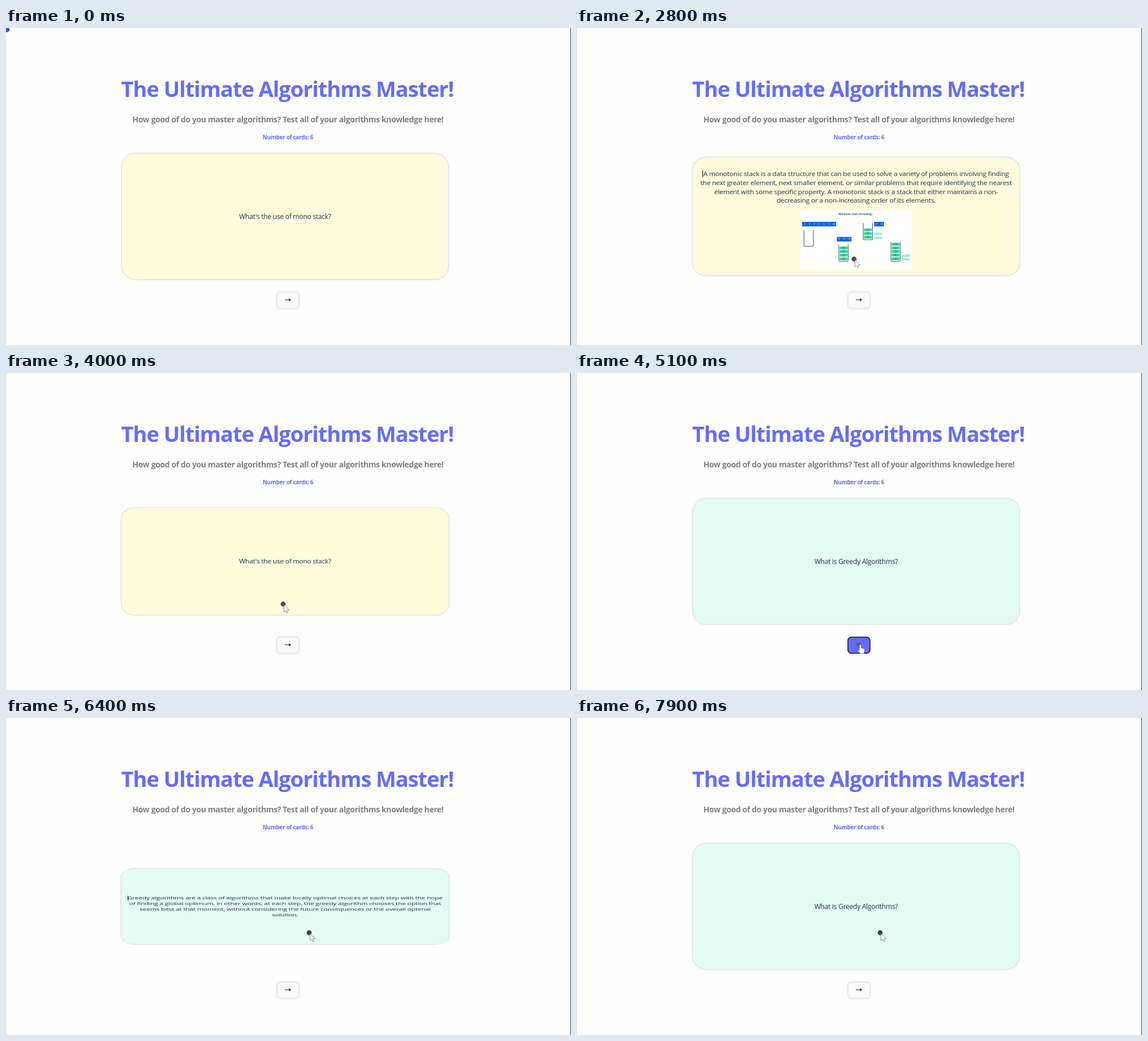
These frames come from a looping animation (999x561 px, 8000 ms). An HTML page:

```html
<!DOCTYPE html>
<html lang="en">
<head>
<meta charset="utf-8">
<title>Flash cards</title>
<style>
  html, body { margin: 0; width: 100%; height: 100%; overflow: hidden; background: #fefefe; }
  svg { display: block; width: 999px; height: 561px; }
  text { font-family: "Open Sans", "Noto Sans", sans-serif; text-anchor: middle; fill: #213547; }
  .bold { font-weight: 700; letter-spacing: -.028em; }
  .body { font-size: 12px; letter-spacing: -.02em; }
  .accent { fill: #646cff; }
  .tiny { font-size: 4.6px; }
  #face { stroke: #dcdddd; filter: drop-shadow(0 0 1.5px rgba(0, 0, 0, .1)); }
  #button { filter: drop-shadow(0 0 2px rgba(60, 60, 110, .14)); }
</style>
</head>
<body>
<svg viewBox="0 0 999 561">
  <rect x="998" width="1" height="561" fill="#27313a"/>
  <text class="bold accent" x="497.5" y="122" font-size="38">The Ultimate Algorithms Master!</text>
  <text class="bold" x="498.5" y="166.5" font-size="14" style="fill:#808080">How good of do you master algorithms? Test all of your algorithms knowledge here!</text>
  <text class="bold accent" x="498.5" y="196.5" font-size="10">Number of cards: 6</text>

  <g id="card">
    <rect id="face" x="-289" y="-111.5" width="578" height="223" rx="24"/>
    <text id="question" class="body" y="4.5"></text>
    <g id="answer"></g>
    <g id="diagram"></g>
    <path id="caret" stroke="#222" stroke-width="1.2"/>
  </g>

  <rect id="button" x="479" y="467.5" width="39" height="28.5" rx="6"/>
  <path id="arrow" d="M493 480.4h7.2v-1.9l4.3 2.5-4.3 2.5v-1.9h-7.2z"/>

  <g id="cursor">
    <circle id="dot" r="4.4"/>
    <path id="pointer" d="M1.5 1.5v12.5l3-2.6 2 4.4 2.2-1-2-4.3h4z" fill="#fff" stroke="#777" stroke-width=".8"/>
    <path id="hand" d="M1 1.5q0-2 1.4-2t1.4 2v4.2l5 1.2q1.5.5 1.3 2.2l-.8 4.4-1.3 2.2h-5.6l-3.8-4.8q-.5-1.8 1.2-1.6l1.2.9z" fill="#fff" stroke="#666" stroke-width=".5"/>
  </g>
</svg>
<script>
const LOOP = 8000, STEP = 100, FLIP = 500, SWAP = 5100;
const flips = [2498, 3738, 6192, 7420];
const $ = id => document.getElementById(id);
const show = (id, on) => $(id).setAttribute('display', on ? 'inline' : 'none');
const attr = (id, name, value) => $(id).setAttribute(name, value);

const cards = [
  { fill: '#fefadc', dot: '#4c4c4a', question: "What's the use of mono stack?", top: -76, caretX: -271,
    answer: ['A monotonic stack is a data structure that can be used to solve a variety of problems involving finding',
      'the next greater element, next smaller element, or similar problems that require identifying the nearest',
      'element with some specific property. A monotonic stack is a stack that either maintains a non-',
      'decreasing or a non-increasing order of its elements.'] },
  { fill: '#e3fbf3', dot: '#2d4650', question: 'What is Greedy Algorithms?', top: -20.5, caretX: -277,
    answer: ['Greedy algorithms are a class of algorithms that make locally optimal choices at each step with the hope',
      'of finding a global optimum. In other words, at each step, the greedy algorithm chooses the option that',
      'seems best at that moment, without considering the future consequences or the overall optimal',
      'solution.'] }
];

// time, x, y of the mouse
const path = [
  [0, 2, 3], [199, 2, 3], [200, 808, 130], [300, 808, 130], [400, 796, 160], [500, 755, 240],
  [600, 685, 325], [700, 628, 364], [800, 628, 364], [1200, 570, 420], [1500, 505, 476],
  [1700, 498, 471], [1800, 498, 471], [2000, 481, 440], [2200, 490, 409], [4300, 490, 409],
  [4600, 497, 471], [4800, 498.5, 481], [5500, 498.5, 481], [5800, 536, 380], [LOOP, 536, 380]
];

function mouse(t) {
  const i = path.findIndex(p => p[0] > t);
  const [t0, x0, y0] = path[i - 1], [t1, x1, y1] = path[i];
  const k = (t - t0) / (t1 - t0);
  return [x0 + (x1 - x0) * k, y0 + (y1 - y0) * k];
}

// cubic-bezier(.25, .1, .25, 1)
function ease(x) {
  if (x <= 0) return 0;
  if (x >= 1) return 1;
  const curve = (a, b, u) => 3 * a * u * (1 - u) ** 2 + 3 * b * u * u * (1 - u) + u ** 3;
  let lo = 0, hi = 1;
  for (let i = 0; i < 20; i++) {
    const mid = (lo + hi) / 2;
    if (curve(.25, .25, mid) < x) lo = mid; else hi = mid;
  }
  return curve(.1, 1, lo);
}

function drawDiagram() {
  const rect = (x, y, w, h, fill, more = '') =>
    `<rect x="${x}" y="${y}" width="${w}" height="${h}" fill="${fill}" ${more}/>`;
  const label = (x, y, s, fill) => `<text class="tiny" x="${x}" y="${y}" style="fill:${fill}">${s}</text>`;
  const bar = (x, y, list) => rect(x, y, list.length * 8.6, 8, '#0d63e8') +
    list.map((n, i) => label(x + 4.3 + i * 8.6, y + 5.7, n, '#d5e6ff')).join('');
  const block = (x, y, n, faded) => `<g opacity="${faded ? .4 : 1}">` +
    rect(x, y - 2.5, 14, 5, '#3ecf9a', 'rx="1"') + label(x + 7, y + 1.7, n, '#1450a8') + '</g>';
  const stack = (x, top, bottom, list) =>
    `<path d="M${x} ${top}V${bottom - 2}q0 2 2 2h12.5q2 0 2-2V${top}" fill="none" stroke="#3f5573"/>` +
    list.map((n, i) => block(x + 1.3, bottom - 4.5 - i * 6.4, n)).join('');

  $('diagram').innerHTML =
    rect(395, 323, 197, 104, '#fff') +
    '<text x="492" y="331.5" font-size="4.3" font-weight="600">Monotonic Stack (Increasing)</text>' +
    bar(398, 343, [2, 5, 7, 11, 9, 17, 19]) + stack(401.5, 357, 386, []) +
    bar(459.5, 369.5, [9, 17, 19]) + stack(463, 383, 412.5, [2, 5, 7, 11]) +
    bar(525.5, 343, [17, 19]) + stack(506, 345, 374.5, [2, 5, 9]) +
    block(525, 364, 7, true) + block(525, 371, 11, true) +
    stack(555, 378, 412.5, [2, 5, 9, 17, 19]) +
    block(574, 402.5, 7, true) + block(574, 409, 11, true);
  attr('diagram', 'transform', 'scale(1 1.072) translate(-493.5 -333.5)');
}

let current;
function setCard(card) {
  if (card === current) return;
  current = card;
  attr('face', 'fill', card.fill);
  $('question').textContent = card.question;
  $('answer').innerHTML = card.answer.map((line, i) =>
    `<text class="body" y="${card.top + i * 16.8}">${line}</text>`).join('');
  attr('caret', 'd', `M${card.caretX} ${card.top - 11}v13.5`);
}

function draw() {
  const t = Math.floor(performance.now() % LOOP / STEP) * STEP;
  const [x, y] = mouse(t);
  const first = t < SWAP;
  const card = cards[first ? 0 : 1];
  setCard(card);

  const angle = Math.PI * flips.reduce((sum, start) => sum + ease((t - start) / FLIP), 0);
  const cos = Math.cos(angle), back = cos < 0;
  const wide = 1 + .004 * Math.abs(Math.sin(angle));
  attr('card', 'transform', `translate(493.5 333.5) scale(${wide} ${Math.abs(cos)})`);
  show('question', !back);
  show('answer', back);
  show('diagram', back && first);
  show('caret', back && (first ? t < 3400 : t < 7000 || t >= 7200));

  const hover = x > 479 && x < 518 && y > 467 && y < 497;
  const focus = t >= SWAP && t < 6000;
  attr('button', 'fill', hover ? '#646cff' : '#f9f9f9');
  attr('button', 'stroke', focus ? '#15171f' : hover ? '#646cff' : '#dcdce4');
  attr('button', 'stroke-width', focus ? 1.5 : 1);
  attr('arrow', 'fill', hover ? '#7b82f5' : '#2b2b2b');

  const onCard = x > 204 && x < 783 && y > 222 && y < 445;
  attr('cursor', 'transform', `translate(${x} ${y})`);
  attr('dot', 'fill', hover ? '#45484f' : onCard ? back && first ? '#434f66' : card.dot : '#4050b8');
  attr('dot', 'opacity', hover ? .6 : 1);
  show('pointer', t >= 200 && !hover);
  show('hand', hover);
  requestAnimationFrame(draw);
}

drawDiagram();
draw();
</script>
</body>
</html>
```
